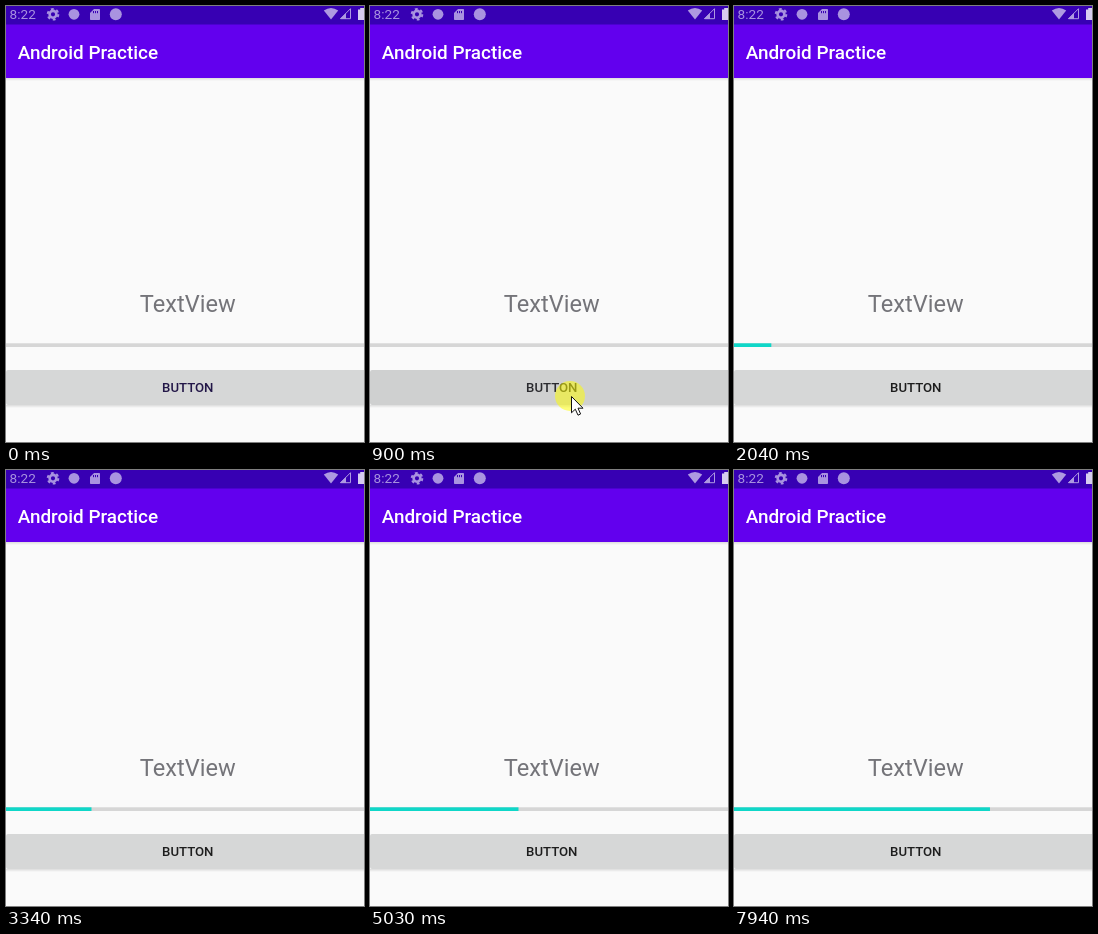
Recreate the animation shown at these times as an HTML page. Size 358 by 436 pixels, loop 8000 ms.

```html
<!DOCTYPE html>
<html lang="en">
<head>
<meta charset="utf-8">
<title>Progress bar</title>
<style>
  html, body { margin: 0; width: 100%; height: 100%; overflow: hidden; background: #fafafa; }
  svg { display: block; width: 358px; height: 436px; font-family: Roboto, sans-serif; }
  .medium { font-weight: 500; }
</style>
</head>
<body>
<svg viewBox="0 0 358 436">
  <defs>
    <linearGradient id="shade" x2="0" y2="1">
      <stop stop-color="#000" stop-opacity=".12"/>
      <stop offset="1" stop-color="#000" stop-opacity="0"/>
    </linearGradient>
    <clipPath id="buttonClip"><rect y="364" width="364" height="35" rx="2"/></clipPath>
  </defs>

  <rect width="358" height="436" fill="#fafafa"/>
  <rect y="72" width="358" height="3" fill="url(#shade)"/>
  <rect width="358" height="72" fill="#6200ee"/>
  <rect width="358" height="18.5" fill="#3700b3"/>

  <!-- status bar -->
  <g fill="#a993e0">
    <text x="3.6" y="13" font-size="13.6">8:22</text>
    <circle cx="47" cy="8.3" r="3.4" fill="none" stroke="#a993e0" stroke-width="2.6"/>
    <circle cx="47" cy="8.3" r="5.3" fill="none" stroke="#a993e0" stroke-width="2" stroke-dasharray="2.8 2.75"/>
    <circle cx="68" cy="8.3" r="5.4"/>
    <path d="M88 3h5.2q.8 0 .8.8v9.4q0 .8-.8.8h-8.4q-.8 0-.8-.8V7z"/>
    <path d="M87.5 5v2.2M89.5 5v2.2M91.5 5v2.2" stroke="#3700b3"/>
    <circle cx="109.8" cy="8.3" r="6"/>
  </g>
  <g fill="#ae99e1">
    <path d="M325 13.5L317.8 4.5Q325-.5 332.2 4.5z"/>
    <path d="M334.5 12.7L344.5 2.7V12.7z" fill="none" stroke="#ae99e1"/>
    <path d="M334 13l6-6v6z"/>
    <path d="M352 14V3.5h2.2V2H358V14z" fill="#d7cdf0"/>
  </g>

  <text class="medium" x="11.8" y="53" font-size="18.9" fill="#fff">Android Practice</text>
  <text x="181.8" y="306" font-size="23.6" text-anchor="middle" fill="#747479">TextView</text>

  <rect y="337.3" width="358" height="3.7" fill="#d6d6d6"/>
  <rect id="bar" y="337.3" height="3.7" fill="#0fd7c8"/>

  <rect y="399" width="364" height="3" fill="url(#shade)"/>
  <g clip-path="url(#buttonClip)">
    <rect y="364" width="364" height="35" fill="#d6d7d7"/>
    <g id="ripple">
      <rect y="364" width="364" height="35" fill-opacity=".008"/>
      <circle id="wave" cx="200" cy="390" fill-opacity=".025"/>
    </g>
  </g>
  <text id="label" class="medium" x="181.8" y="386" font-size="13.2" text-anchor="middle">BUTTON</text>

  <g id="pointer">
    <circle id="glow" r="15" cx="-1" fill="#ff0" fill-opacity=".52"/>
    <path d="M.5.5V16.8L4.3 13.2 7 19.2 9.6 18 7 12.2H12z" fill="#fff" stroke="#111"/>
  </g>
</svg>
<script>
const LOOP = 8000;
const START = 436;    // pointer enters
const TICK = 76.33;   // picture refresh in ms
const PRESS = 4, RELEASE = 7; // in ticks
const UNIT = 3.706;   // bar pixels per percent

const [bar, ripple, wave, label, pointer, glow] =
  ["bar", "ripple", "wave", "label", "pointer", "glow"].map(id => document.getElementById(id));
const clamp = v => Math.min(1, Math.max(0, v));

function draw(t) {
  const n = Math.floor((t - START) / TICK);

  // The counter gains 13 percent every 17 ticks.
  const percent = Math.max(0, Math.ceil(n * 13 / 17 - 6.42));
  bar.setAttribute("width", percent && percent * UNIT + .25);

  const arriving = Math.max(0, 3 - n);
  const leaving = Math.max(0, n - RELEASE) / 3;
  const x = 201 + 1.5 * arriving - 6 * leaving;
  const y = 390 + 12 * arriving + 16 * leaving ** 2;
  pointer.setAttribute("transform", `translate(${x} ${y})`);

  const pressed = n >= PRESS && n < RELEASE;
  const strength = n < PRESS ? 0 : clamp((RELEASE + 2 - n) / 3);
  glow.setAttribute("opacity", pressed ? 1 : 0);
  wave.setAttribute("r", 112 * Math.max(0, n - PRESS));
  ripple.setAttribute("opacity", strength);
  label.setAttribute("fill", n < PRESS ? "#231748" : strength ? "#2b2b2f" : "#1d1d1d");
}

const begin = performance.now();
function frame() {
  draw((performance.now() - begin) % LOOP);
  requestAnimationFrame(frame);
}
frame();
</script>
</body>
</html>
```
